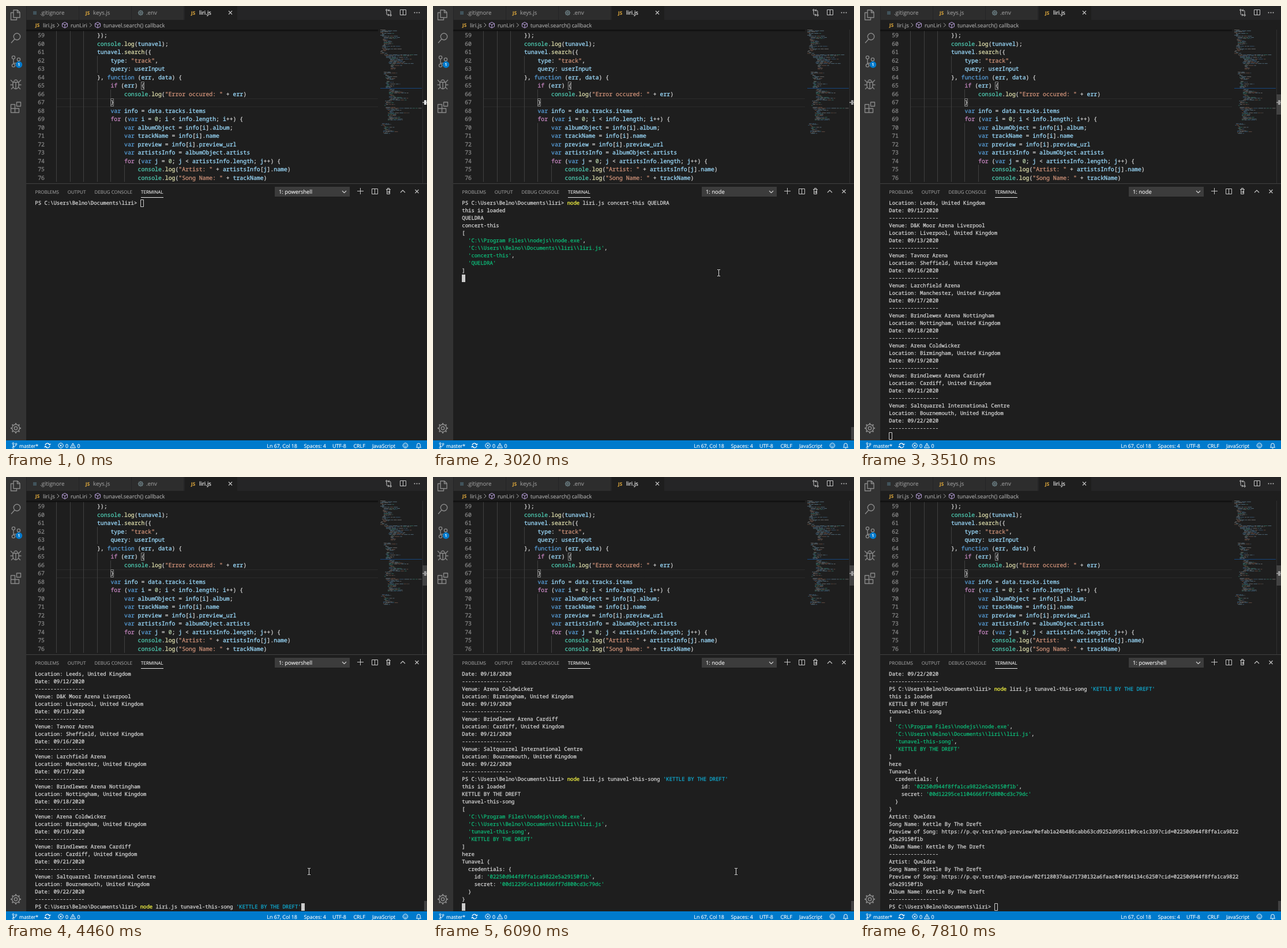
An HTML page with a canvas that plays this animation: 730 by 767 pixels, repeating every 8 s.

```html
<!DOCTYPE html>
<html lang="en">
<head>
<meta charset="utf-8">
<title>Editor and terminal</title>
<style>
html, body { margin: 0; width: 100%; height: 100%; overflow: hidden; background: #1e1e1e; }
canvas { display: block; }
</style>
</head>
<body>
<canvas id="stage" width="730" height="767"></canvas>
<script>
const W = 730, H = 767, LOOP = 8000;
const UI = '"Open Sans", "Noto Sans", sans-serif';
const MONO = '"Noto Sans Mono", "DejaVu Sans Mono", monospace';
const stage = document.getElementById('stage').getContext('2d');
const base = document.createElement('canvas');
base.width = W;
base.height = H;
let g = base.getContext('2d');

// ---- drawing helpers
function box(x, y, w, h, color) {
  g.fillStyle = color;
  g.fillRect(x, y, w, h);
}
// Small text gets a hairline outline so that its stems reach full colour
function glyphs(str, x, y, color, outline) {
  g.fillStyle = g.strokeStyle = color;
  g.lineWidth = outline;
  g.fillText(str, x, y);
  g.strokeText(str, x, y);
}
function label(str, x, y, size, color, weight = 400) {
  g.font = `${weight} ${size}px ${UI}`;
  glyphs(str, x, Math.round(y), color, 0.15);
}
function line(d, color, width = 1) {
  g.strokeStyle = color;
  g.lineWidth = width;
  g.stroke(new Path2D(d));
}
function shape(d, color) {
  g.fillStyle = color;
  g.fill(new Path2D(d));
}
function ring(x, y, r, color, width = 1) {
  g.beginPath();
  g.arc(x, y, r, 0, 7);
  g.strokeStyle = color;
  g.lineWidth = width;
  g.stroke();
}
function disc(x, y, r, color) {
  g.beginPath();
  g.arc(x, y, r, 0, 7);
  g.fillStyle = color;
  g.fill();
}
function gear(x, y, r, color, width) {
  ring(x, y, r * 0.72, color, width);
  ring(x, y, r * 0.3, color, width);
  for (let i = 0; i < 8; i++) {
    const c = Math.cos(i * Math.PI / 4), s = Math.sin(i * Math.PI / 4);
    line(`M${x + c * r * 0.75} ${y + s * r * 0.75}L${x + c * r} ${y + s * r}`, color, width * 1.5);
  }
}
// Monospaced text on a fixed grid of cells
function mono(str, x, y, size, color) {
  g.font = `${size}px ${MONO}`;
  [...str].forEach((ch, i) => ch !== ' ' && glyphs(ch, x + i * size * 0.6, Math.round(y), color, 0.28));
}
function random(seed) {
  return () => (seed = (seed * 16807) % 2147483647) / 2147483647;
}
function hex(n, seed) {
  const rnd = random(seed);
  let out = '';
  for (let i = 0; i < n; i++) out += Math.floor(rnd() * 16).toString(16);
  return out;
}

// ---- code editor
const CODE_SIZE = 9.82, CODE_W = CODE_SIZE * 0.6, CODE_X = 87.2, CODE_H = 14.5;
const CODE = `            });
            console.log(tunavel);
            tunavel.search({
                type: "track",
                query: userInput
            }, function (err, data) {
                if (err) {
                    console.log("Error occured: " + err)
                }
                var info = data.tracks.items
                for (var i = 0; i < info.length; i++) {
                    var albumObject = info[i].album;
                    var trackName = info[i].name
                    var preview = info[i].preview_url
                    var artistsInfo = albumObject.artists
                    for (var j = 0; j < artistsInfo.length; j++) {
                        console.log("Artist: " + artistsInfo[j].name)
                        console.log("Song Name: " + trackName)`.split('\n');

function tokenColor(tok, rest) {
  if (tok[0] === '"') return '#ce9178';
  if (/^\d/.test(tok)) return '#b5cea8';
  if (/^(if|for)$/.test(tok)) return '#c586c0';
  if (/^(var|function)$/.test(tok)) return '#569cd6';
  if (tok === 'console') return '#4ec9b0';
  if (/^\w/.test(tok)) return rest[0] === '(' ? '#dcdcaa' : '#9cdcfe';
  return '#d4d4d4';
}

function drawEditor() {
  g.save();
  g.beginPath();
  g.rect(35, 41, 695, 266);
  g.clip();
  line('M88 160.5H645M88 174.5H645', '#2b2b2b');
  CODE.forEach((src, i) => {
    const top = 43.5 + i * CODE_H, y = top + 10.8, indent = src.search(/\S/);
    for (let c = 0; c < indent; c += 4) box(Math.round(CODE_X + c * CODE_W), top - 0.5, 1, CODE_H + 0.5, '#404040');
    mono(String(59 + i), 55.2, y, CODE_SIZE, '#858585');
    for (const m of src.matchAll(/"[^"]*"|\w+|[^\w\s"]+/g)) {
      const rest = src.slice(m.index + m[0].length);
      mono(m[0], CODE_X + m.index * CODE_W, y, CODE_SIZE, tokenColor(m[0], rest));
    }
  });
  line('M234.5 131.5h5v13h-5zM181.5 160.5h5v13h-5z', '#888888');
  drawMinimap();
  const fade = g.createLinearGradient(0, 41, 0, 45);
  fade.addColorStop(0, 'rgba(0,0,0,.6)');
  fade.addColorStop(1, 'rgba(0,0,0,0)');
  g.fillStyle = fade;
  g.fillRect(35, 41, 610, 4);
  g.restore();
}

function drawMinimap() {
  const rnd = random(41);
  const colors = ['#569cd6', '#9cdcfe', '#4ec9b0', '#ce9178', '#d4d4d4', '#9cdcfe'];
  // top, bottom, left, longest line
  const blocks = [
    [41, 53, 649, 28], [54, 76, 652, 36], [77, 83, 649, 18], [84, 89, 656, 62], [90, 100, 663, 54],
    [101, 110, 667, 24], [114, 121, 655, 22], [122, 128, 658, 62], [130, 141, 657, 24],
    [144, 163, 664, 38], [164, 172, 656, 16], [175, 179, 657, 64], [180, 197, 662, 40],
    [203, 207, 649, 32], [208, 221, 654, 26]
  ];
  box(649, 142, 72, 1, '#17457a');
  g.globalAlpha = 0.42;
  for (const [top, bottom, left, longest] of blocks) {
    for (let y = top; y < bottom; y += 1.53) {
      let x = left + Math.floor(rnd() * 3) * 1.5;
      const end = Math.min(721, x + longest * (0.15 + 0.85 * rnd() ** 1.6));
      while (x < end) {
        const w = Math.min(end - x, 2 + rnd() * 7);
        box(x, y, w, 0.9, colors[Math.floor(rnd() * colors.length)]);
        x += w + 1.2;
      }
    }
  }
  g.globalAlpha = 1;
  box(722, 41, 1, 266, '#303030');
}

// ---- fixed window parts
function cube(x, y) {
  line(`M${x} ${y - 5}l4.5 2.4v5.2l-4.5 2.4l-4.5 -2.4v-5.2zM${x - 4.5} ${y - 2.6}l4.5 2.3l4.5 -2.3M${x} ${y - 0.3}v5.3`, '#b9a0dc');
}
function splitIcon(x, y) {
  line(`M${x - 4.5} ${y - 4.5}h10v9h-10zM${x + 0.5} ${y - 4.5}v9`, '#c5c5c5');
}
function cross(x, y, r) {
  line(`M${x - r} ${y - r}l${2 * r} ${2 * r}M${x + r} ${y - r}l${-2 * r} ${2 * r}`, '#c5c5c5', 1.1);
}

function drawTabs() {
  box(35, 0, 695, 24, '#252526');
  [36, 127, 218].forEach(x => box(x, 0, 90, 24, '#2d2d2d'));
  box(310, 0, 91, 24, '#1e1e1e');
  box(47, 9, 6, 6, '#41535b');
  gear(233.5, 11.8, 4.6, '#6d8086', 1.2);
  const js = '#d9a53c';
  label('.gitignore', 59, 15.3, 9.7, '#969696');
  label('JS', 138, 15, 8, js, 700);
  label('keys.js', 151, 15.3, 9.7, '#969696');
  label('.env', 243, 15.3, 9.7, '#969696');
  label('JS', 321, 15, 8, js, 700);
  label('liri.js', 335, 15.3, 9.7, '#ffffff');
  cross(389, 11.5, 3);
  line('M660 8v5.5q0 2 2 2h2M662.5 13.5l2 2l-2 2M667 15v-5.5q0 -2 -2 -2h-2M664.5 5.5l-2 2l2 2', '#c5c5c5');
  ring(660, 7, 1.3, '#c5c5c5');
  ring(667, 16, 1.3, '#c5c5c5');
  splitIcon(688, 11);
  [708.5, 712.5, 716.5].forEach(x => disc(x, 11.5, 1, '#c5c5c5'));

  label('JS', 51, 36.3, 8, js, 700);
  label('liri.js', 64, 36.8, 9.6, '#a9a9a9');
  label('runLiri', 112, 36.8, 9.4, '#a9a9a9');
  label('tunavel.search() callback', 169, 36.8, 9.4, '#a9a9a9');
  line('M88.5 29.5l3.5 3.5l-3.5 3.5M145 29.5l3.5 3.5l-3.5 3.5', '#a9a9a9');
  cube(102, 33);
  cube(159, 33);
}

function drawActivityBar() {
  const c = '#8a8a8a', w = 1.4;
  box(0, 0, 35, 752, '#333333');
  line('M13 7h7l4 4v9h-11zM19.5 7v4.5h4.5M13 11.5h-4.5v12.5h10v-4', c, w);
  ring(19, 53, 5.7, c, w);
  line('M15 57.2L9 64', c, w);
  ring(13, 89, 2.6, c, w);
  ring(13, 103, 2.6, c, w);
  ring(22, 92.5, 2.6, c, w);
  line('M13 91.6v8.8M22 95q0 4 -4 4h-5', c, w);
  line('M12 132h10v6a5 5.5 0 0 1 -10 0zM13.5 132a3.5 4 0 0 1 7 0M17 132v11M8 128l4 4M26 128l-4 4M7.5 136.5h4.5M22 136.5h4.5M9 144l3.5 -3.5M25 144l-3.5 -3.5', c, w);
  line('M8.5 170.5h7v7h-7zM8.5 177.5h7v7h-7zM15.5 177.5h7v7h-7zM18.5 166.5h7v7h-7z', c, w);
  gear(17, 731, 9, c, 1.5);
}

function drawPanel() {
  box(35, 307, 695, 1, '#414141');
  label('PROBLEMS', 50.5, 324.7, 8, '#979797');
  label('OUTPUT', 106.8, 324.7, 8, '#979797');
  label('DEBUG CONSOLE', 153.5, 324.7, 8, '#979797');
  label('TERMINAL', 234, 324.7, 8, '#e7e7e7');
  box(234, 331, 39, 1, '#e7e7e7');
  box(466, 313, 130, 17, '#3c3c3c');
  line('M583 320l3.5 3.5l3.5 -3.5', '#d0d0d0', 1.1);
  line('M609 320.5h11M614.5 315v11', '#c5c5c5');
  splitIcon(639, 321);
  line('M659 317.5h8M661.5 317.5v-2h3v2M660.5 318v7.5h5v-7.5M662.5 320v4M664.5 320v4', '#c5c5c5');
  line('M684 323l4 -4l4 4', '#c5c5c5', 1.1);
  cross(712.5, 321, 3);
}

function drawStatusBar() {
  const c = '#ffffff', y = 764.6;
  box(0, 752, W, 15, '#007acc');
  ring(12.5, 757.5, 1.4, c);
  ring(12.5, 764.5, 1.4, c);
  ring(17.5, 758.5, 1.4, c);
  line('M12.5 759v4M17.5 760q0 2.5 -5 2.5', c);
  label('master*', 23, y, 8.6, c);
  line('M68 760.5a4 4 0 0 1 7.6 -1M76 761.5a4 4 0 0 1 -7.6 1M77.5 758l-2 2l-2 -1.8M66.5 764l2 -2l2 1.8', c, 1.1);
  ring(95, 761, 4.2, c);
  line('M93.3 759.3l3.4 3.4M96.7 759.3l-3.4 3.4', c);
  label('0', 103, y, 8.9, c);
  line('M116 757l4.5 8h-9zM116 760v2.5M116 763v1', c);
  label('0', 123.5, y, 8.9, c);
  label('Ln 67, Col 18', 452.3, y, 8.9, c);
  label('Spaces: 4', 516.5, y, 8.9, c);
  label('UTF-8', 566, y, 8.9, c);
  label('CRLF', 602.5, y, 8.9, c);
  label('JavaScript', 635, y, 8.9, c);
  ring(692.5, 761, 4.2, c);
  disc(691, 760, 0.7, c);
  disc(694, 760, 0.7, c);
  line('M690.3 762.3q2.2 2.4 4.4 0', c);
  line('M711.5 764.2h8l-1.2 -1.7v-2.5a2.8 2.8 0 0 0 -5.6 0v2.5zM714.5 765.8h2', c);
}

// ---- terminal
const TERM_SIZE = 8.94, TERM_W = TERM_SIZE * 0.6, TERM_X = 50.3, TERM_Y = 335, ROW = 13, ROWS = 32, COLS = 113;
const PROMPT = String.raw`PS C:\Users\Belno\Documents\liri> `;
const RULE = '-'.repeat(16) + '\n';
const ACT = 'Queldra', SONG = 'Kettle By The Dreft', ID = hex(32, 77);

const argv = (cmd, arg) => String.raw`${arg}
${cmd}
[
  'C:\\Program Files\\nodejs\\node.exe',
  'C:\\Users\\Belno\\Documents\\liri\\liri.js',
  '${cmd}',
  '${arg}'
]
`;
const gig = (venue, city, day) =>
  `Venue: ${venue}\nLocation: ${city}, United Kingdom\nDate: 09/${day}/2020\n${RULE}`;
const track = seed =>
  `Artist: ${ACT}\nSong Name: ${SONG}\nPreview of Song: https://p.qv.test/mp3-preview/${hex(40, seed)}?cid=${ID}\nAlbum Name: ${SONG}\n${RULE}`;

const gigs = `Location: Leeds, United Kingdom\nDate: 09/12/2020\n${RULE}` + [
  ['D&K Moor Arena Liverpool', 'Liverpool', 13],
  ['Tavnor Arena', 'Sheffield', 16],
  ['Larchfield Arena', 'Manchester', 17],
  ['Brindlewex Arena Nottingham', 'Nottingham', 18],
  ['Arena Coldwicker', 'Birmingham', 19],
  ['Brindlewex Arena Cardiff', 'Cardiff', 21],
  ['Saltquarrel International Centre', 'Bournemouth', 22]
].map(a => gig(...a)).join('');

const client = `here
Tunavel {
  credentials: {
    id: '${ID}',
    secret: '${hex(32, 905)}'
  }
}
`;

// Text written to the terminal at each time
const LOG = [
  [0, PROMPT],
  [2320, `node liri.js concert-this ${ACT.toUpperCase()}`],
  [2720, '\n'],
  [2790, 'this is loaded\n'],
  [3020, argv('concert-this', ACT.toUpperCase())],
  [3350, gigs],
  [3590, PROMPT],
  [4460, `node liri.js tunavel-this-song '${SONG.toUpperCase()}'`],
  [5790, '\n'],
  [5860, 'this is loaded\n'],
  [6090, argv('tunavel-this-song', SONG.toUpperCase()) + client],
  [6950, track(311) + track(5209)],
  [7030, PROMPT]
];

// Pointer: time, kind, x, y
const POINTER = [
  [0], [680, 'arrow', 720, 755], [2080, 'arrow', 658, 353], [2160, 'arrow', 600, 392],
  [2240, 'beam', 530, 438], [2320, 'beam', 490, 459], [2470, 'beam', 495, 462],
  [3350, 'beam', 610, 610], [3430, 'arrow', 721, 754], [3510],
  [4060, 'arrow', 715, 748], [4140, 'arrow', 630, 610], [4220, 'beam', 542, 518],
  [4300, 'beam', 530, 610], [4380, 'beam', 525, 683], [7730, 'arrow', 720, 755], [7810]
];

const during = (t, ...spans) => spans.some(([a, b]) => t >= a && t < b);

function drawTerminal(t) {
  const text = LOG.filter(e => e[0] <= t).map(e => e[1]).join('');
  const rows = text.split('\n').flatMap(s => s.match(new RegExp(`.{1,${COLS}}`, 'g')) || ['']).slice(-ROWS);
  rows.forEach((row, i) => {
    const typed = row.startsWith('PS ');
    for (const m of row.matchAll(/'[^']*'|[^\s']+/g)) {
      const tok = m[0];
      let color = '#d4d4d4';
      if (tok[0] === "'") color = typed ? '#11a8cd' : '#0dbc79';
      else if (typed && tok === 'node') color = '#f5f543';
      mono(tok, TERM_X + m.index * TERM_W, TERM_Y + i * ROW + 9.4, TERM_SIZE, color);
    }
  });
  const x = Math.round(TERM_X + rows[rows.length - 1].length * TERM_W), y = TERM_Y + (rows.length - 1) * ROW;
  if (during(t, [2240, 3430], [4300, 7730])) box(x, y, 6, 13, '#cccccc');
  else line(`M${x + 0.5} ${y + 0.5}h5v12h-5z`, '#cccccc');
}

function drawPointer(t) {
  const [, kind, x, y] = POINTER.filter(e => e[0] <= t).pop();
  if (kind === 'arrow') {
    const d = `M${x} ${y}v11l2.6 -2.4l1.9 4.2l1.9 -.9l-1.9 -4h3.3z`;
    shape(d, '#ffffff');
    line(d, '#000000', 0.6);
  } else if (kind === 'beam') {
    line(`M${x + 0.5} ${y - 5}v10M${x - 2} ${y - 5.5}h2l.5 .5l.5 -.5h2M${x - 2} ${y + 5.5}h2l.5 -.5l.5 .5h2`, '#e0e0e0');
  }
}

function drawScrollbars(t) {
  if (t >= 3350) box(722, 153, 8, 35, '#424242');
  box(722, 166, 8, 2, '#8c8c8c');
  box(725, 163, 4, 8, t < 680 ? '#e0e0e0' : '#9a9a9a');
  if (during(t, [130, 520])) box(725, 729, 5, 22, '#303030');
  if (during(t, [520, 3350])) box(725, 729, 5, 22, '#424242');
  if (t >= 4060) box(725, 734, 5, 17, '#424242');
}

function drawBadge(t) {
  disc(22.5, 101.5, 5.7, '#007acc');
  if (during(t, [7520, 7730])) {
    ring(22.5, 101.5, 2.8, '#ffffff', 0.9);
    line('M22.5 99.8v1.8h1.5', '#ffffff', 0.9);
  } else {
    label('1', 20.3, 104.3, 7.4, '#ffffff', 600);
  }
}

function drawBase() {
  g.textRendering = 'geometricPrecision';
  g.lineJoin = 'round';
  box(0, 0, W, H, '#1e1e1e');
  drawTabs();
  drawEditor();
  drawPanel();
  drawActivityBar();
  drawStatusBar();
}

function draw(now) {
  const t = now % LOOP;
  g.drawImage(base, 0, 0);
  drawScrollbars(t);
  drawBadge(t);
  label(during(t, [2790, 3750], [5860, 7110]) ? '1: node' : '1: powershell', 473, 325.2, 9.4, '#f0f0f0');
  drawTerminal(t);
  drawPointer(t);
}

drawBase();
g = stage;
g.textRendering = 'geometricPrecision';
g.lineJoin = 'round';
const start = performance.now();
function tick() {
  draw(performance.now() - start);
  requestAnimationFrame(tick);
}
tick();
</script>
</body>
</html>
```
